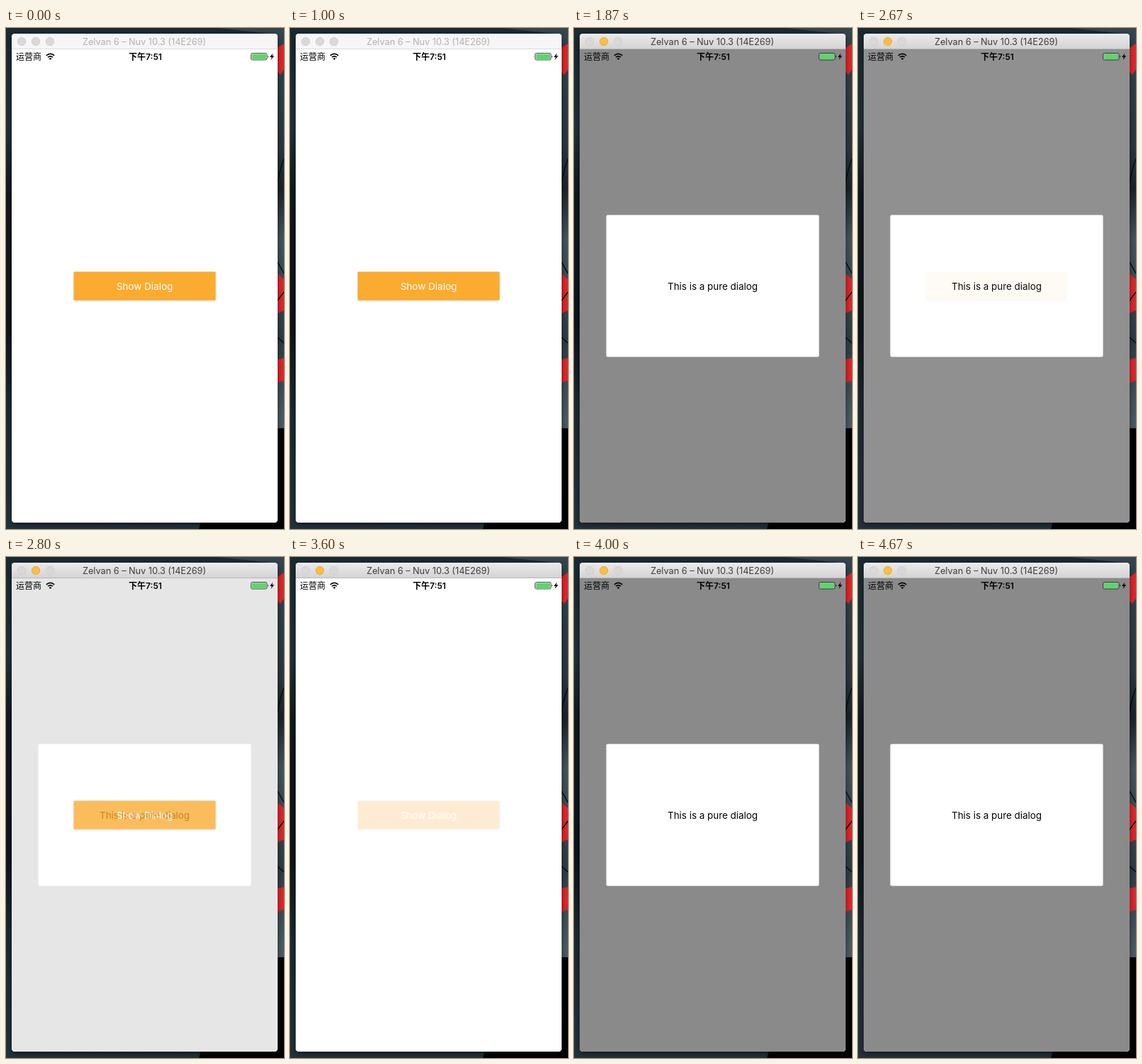
Write an HTML page that moves like this. It is 392 px wide and 706 px high and loops after 4740 ms.

```html
<!DOCTYPE html>
<html lang="zh-CN">
<head>
<meta charset="utf-8">
<style>
html, body { margin: 0; width: 100%; height: 100%; overflow: hidden; background: #0b1216; }
svg { display: block; width: 392px; height: 706px; font-family: Inter, "Noto Sans CJK SC", "Noto Sans CJK", sans-serif; }
.mid { text-anchor: middle; }
#window { filter: drop-shadow(0 3px 4px rgba(0, 0, 0, .5)); }
#button rect { filter: drop-shadow(0 1px 1px rgba(0, 0, 0, .2)); }
</style>
</head>
<body>
<svg viewBox="0 0 392 706">
  <defs>
    <linearGradient id="left" x2="0" y2="1">
      <stop offset="0" stop-color="#1b2a31"/>
      <stop offset=".2" stop-color="#22323a"/>
      <stop offset=".33" stop-color="#10191e"/>
      <stop offset=".6" stop-color="#0d161b"/>
      <stop offset=".75" stop-color="#1c2a31"/>
      <stop offset="1" stop-color="#23343c"/>
    </linearGradient>
    <linearGradient id="right" x2="0" y2="1">
      <stop offset="0" stop-color="#35464e"/>
      <stop offset=".24" stop-color="#2a383f"/>
      <stop offset=".32" stop-color="#1a2429"/>
      <stop offset=".42" stop-color="#45565e"/>
      <stop offset=".62" stop-color="#2e3d44"/>
      <stop offset=".78" stop-color="#4a5c64"/>
    </linearGradient>
    <linearGradient id="bar" x2="0" y2="1">
      <stop offset="0" stop-color="#ebebeb"/>
      <stop offset="1" stop-color="#d3d3d3"/>
    </linearGradient>
    <clipPath id="frame"><rect x="8" y="8" width="375" height="689" rx="4.5"/></clipPath>
  </defs>

  <rect width="392" height="706" fill="url(#left)"/>
  <path d="M300 0h92v706h-20V8z" fill="url(#right)"/>
  <path d="M392 22l-9 6v34l4 4 5-8zM383 346l9 8v44l-9 4zM383 467l9-2v32l-9 3z" fill="#e0282c"/>
  <path d="M383 218q4-22 9-34M383 384l9-12M383 330l9 16M383 436l9 8" fill="none" stroke="#080b0d" stroke-width="1.5"/>
  <path d="M392 564H380V692H276l-4 14h120z" fill="#020304"/>

  <rect id="window" x="8" y="8" width="375" height="689" rx="4.5" fill="#fff"/>
  <g clip-path="url(#frame)">
    <rect x="8" y="30" width="375" height="667" fill="#fff"/>
    <g id="button">
      <rect x="95.5" y="343.5" width="200" height="40" rx="1" fill="#fbab2f"/>
      <text class="mid" x="195.5" y="368.6" font-size="13.5" fill="#fff">Show Dialog</text>
    </g>
    <g id="dialog">
      <path d="M8 30h375v667H8z" fill="#000" fill-opacity=".46"/>
      <rect x="45.5" y="263.5" width="300" height="200" rx="2" fill="#fff"/>
      <text class="mid" x="195.5" y="368.6" font-size="13.4">This is a pure dialog</text>
    </g>

    <text x="14" y="44.8" font-size="12">运营商</text>
    <text class="mid" x="196.5" y="44.8" font-size="12" font-weight="600">下午7:51</text>
    <g fill="none" stroke="#000" stroke-width="1.7">
      <path d="M56.8 38.8q5.7-4.8 11.4 0M59 41.2q3.5-2.8 7 0"/>
      <path d="M62.5 45l-2-2.1q2-1.5 4 0z" fill="#000" stroke="none"/>
    </g>
    <rect x="345.5" y="35.5" width="22.5" height="9.5" rx="2" fill="#fff" fill-opacity=".3" stroke="#222" stroke-width=".8"/>
    <rect x="346.6" y="36.6" width="20.3" height="7.3" rx="1" fill="#5cd66c"/>
    <path d="M369 38.5q1.8 1.7 0 3.5z"/>
    <path d="M376.4 35.5l-4.4 5.4h2.7l-1.2 4.1 4.7-5.7h-2.8z"/>

    <rect id="titlebar" x="8" y="8" width="375" height="22"/>
    <path id="edge" d="M8 29.5h375"/>
    <g fill="#d9d9d9" stroke="#c9c9c9" stroke-width=".8">
      <circle cx="22" cy="19" r="5.7"/>
      <circle id="minimise" cx="42" cy="19" r="5.7"/>
      <circle cx="62" cy="19" r="5.7"/>
    </g>
    <text id="title" class="mid" x="195" y="23.8" font-size="12.7">Zelvan 6 – Nuv 10.3 (14E269)</text>
  </g>
</svg>
<script>
const LOOP = 4740, FPS = 15, ACTIVATE = 1200, CLOSE = 2636;
const TAPS = [{ press: 1250, release: 1420, open: 1432 }, { press: 3420, release: 3585, open: 3615 }];
const $ = id => document.getElementById(id);

// Ease-in-out from start over duration, 0 to 1
function ramp(t, start, duration) {
  const p = Math.min(1, Math.max(0, (t - start) / duration));
  const half = x => Math.pow(x, 1.7) / 2;
  return p < .5 ? half(2 * p) : 1 - half(2 - 2 * p);
}

function draw(t) {
  const active = t >= ACTIVATE;
  $('titlebar').setAttribute('fill', active ? 'url(#bar)' : '#f6f6f6');
  $('edge').setAttribute('stroke', active ? '#b8b8b8' : '#dcdcdc');
  $('title').setAttribute('fill', active ? '#3c3c3c' : '#b2b2b2');
  $('minimise').setAttribute('fill', active ? '#fdbe41' : '#d9d9d9');
  $('minimise').setAttribute('stroke', active ? '#e0a23a' : '#c9c9c9');

  let touch = 0, shown = -ramp(t, CLOSE, 236);
  for (const { press, release, open } of TAPS) {
    touch += ramp(t, press, 150) - ramp(t, release, 250);
    shown += ramp(t, open, 236);
  }
  $('button').setAttribute('opacity', 1 - .8 * touch);
  $('dialog').setAttribute('opacity', Math.max(0, shown));
}

function tick() {
  const t = performance.now() % LOOP;
  draw(Math.floor(t * FPS / 1000 + .08) * 1000 / FPS);
  requestAnimationFrame(tick);
}
tick();
</script>
</body>
</html>
```
